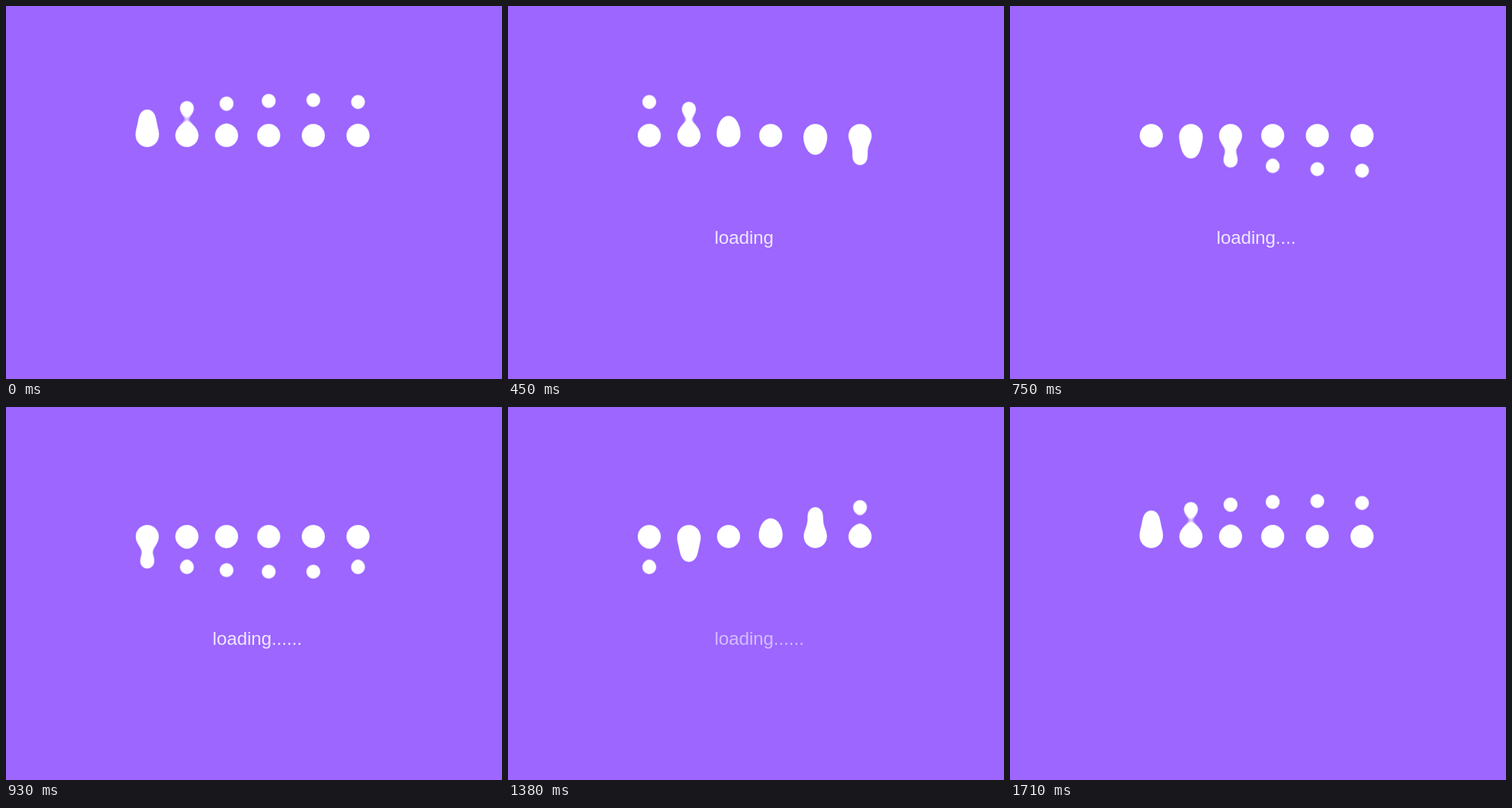
Recreate the animation shown at these times as an HTML page. Size 658x494 px, loop 1740 ms.

```html
<!DOCTYPE html>
<html lang="en">
<head>
<meta charset="utf-8">
<title>Loading drops</title>
<style>
  html, body { margin: 0; width: 100%; height: 100%; overflow: hidden; background: #9c66ff; }
  svg { display: block; }
  text { font: 24.3px "Liberation Sans", Arial, sans-serif; fill: #fff; }
</style>
</head>
<body>
<svg width="658" height="494" viewBox="0 0 658 494">
  <filter id="goo" filterUnits="userSpaceOnUse" x="0" y="0" width="658" height="494" color-interpolation-filters="sRGB">
    <feGaussianBlur stdDeviation="9.3"/>
    <feColorMatrix values="0 0 0 0 1  0 0 0 0 1  0 0 0 0 1  0 0 0 20 -7.84"/>
  </filter>
  <g id="drops" fill="#fff" filter="url(#goo)"></g>
  <text id="label" x="274" y="315"></text>
</svg>
<script>
const LOOP = 1740, STEP = 30, LAG = 90;
const MID = 171.5, BIG = 16.05, SMALL = 11.6;
const columns = [187.4, 240, 292.6, 348.5, 407.7, 467];
// Height of a droplet through one swing, one point per LAG
const swing = [146.3, 135, 129.2, 125.7, 124.6, 127, 136, 155, 171.5, 187.5,
               201.5, 210, 215, 217.5, 218.3, 215.5, 202, 182, 163];
const WORD = "loading......", CHAR_MS = 63;
const FADE_START = 1280, FADE_MS = 300;

const drops = document.getElementById("drops");
const label = document.getElementById("label");

function circle(x, r) {
  const c = document.createElementNS("http://www.w3.org/2000/svg", "circle");
  c.setAttribute("cx", x);
  c.setAttribute("cy", MID);
  c.setAttribute("r", r);
  return drops.appendChild(c);
}

const droplets = columns.map(x => {
  circle(x, BIG);
  return circle(x, SMALL);
});

// Smooth closed curve through the swing points (Catmull-Rom)
function height(time) {
  const u = time / LAG, i = Math.floor(u), f = u - i;
  const [a, b, c, d] = [-1, 0, 1, 2].map(k => swing[(i + k + swing.length) % swing.length]);
  return b + f / 2 * (c - a + f * (2 * a - 5 * b + 4 * c - d + f * (3 * (b - c) + d - a)));
}

function draw() {
  const t = Math.floor(performance.now() / STEP) * STEP % LOOP;
  droplets.forEach((c, i) => c.setAttribute("cy", height(t + i * LAG)));
  label.textContent = WORD.slice(0, Math.floor(t / CHAR_MS));
  const fade = Math.min(1, Math.max(0, (t - FADE_START) / FADE_MS));
  label.setAttribute("opacity", 0.85 * (1 - fade));
  requestAnimationFrame(draw);
}
draw();
</script>
</body>
</html>
```
